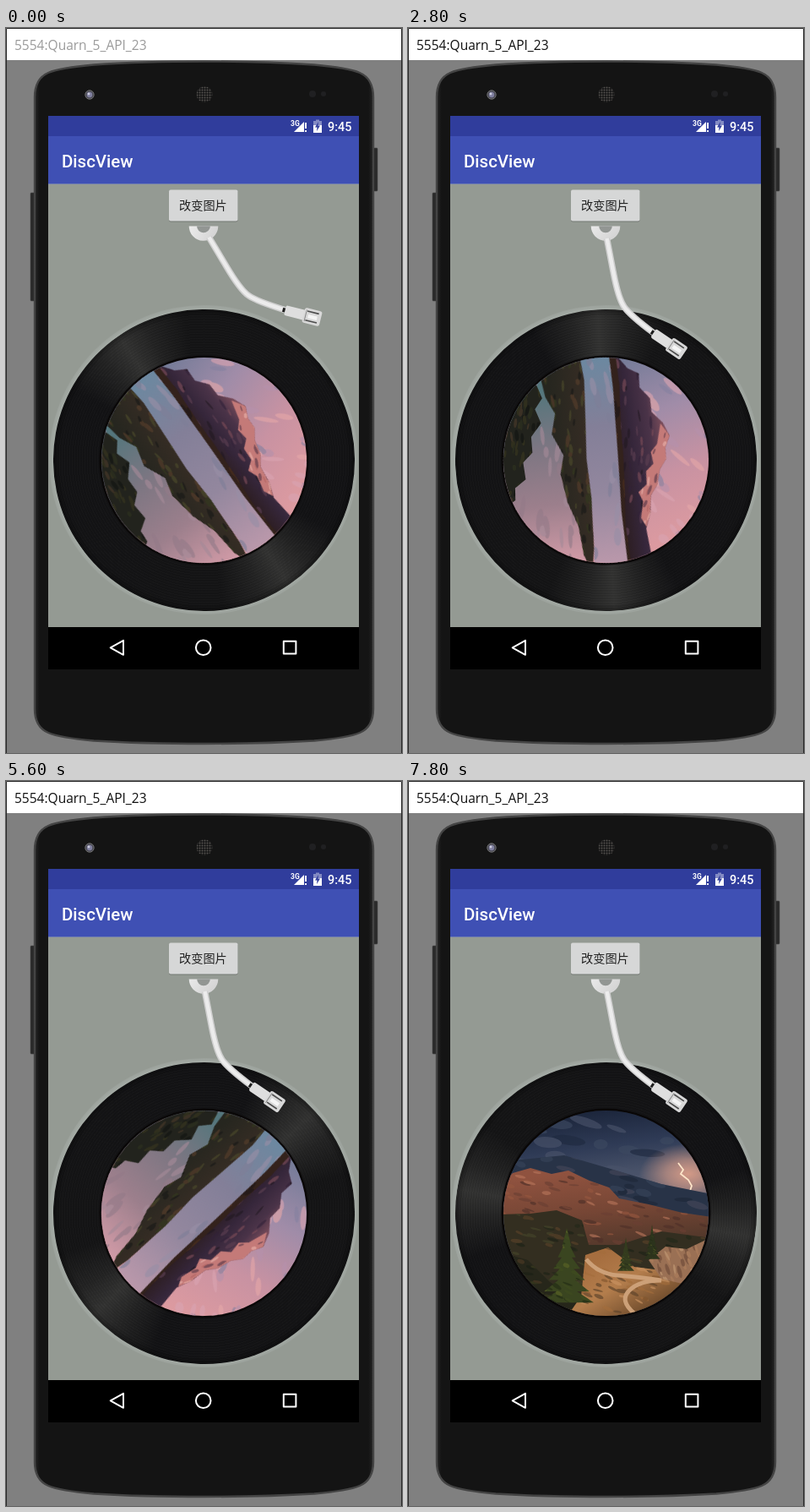
Animation, 469 px wide and 858 px high, one loop 8000 ms. Source, as an HTML page:

```html
<!DOCTYPE html>
<html lang="zh">
<head>
<meta charset="utf-8">
<title>DiscView</title>
<style>
html, body { margin: 0; width: 100%; height: 100%; overflow: hidden; background: #808080; }
#stage { position: relative; width: 469px; height: 858px; overflow: hidden; }
#stage > svg { position: absolute; left: 0; top: 0; }
#view { position: absolute; left: 50px; top: 185px; width: 368px; height: 524px; overflow: hidden; background: #949a93; }
.slot {
  position: absolute; left: 1px; top: 143px; width: 366px; height: 366px; border-radius: 50%;
  background: radial-gradient(closest-side, #a4aba5 97.5%, #9ba19b);
}
.disc {
  position: absolute; left: 4.5px; top: 4.5px; width: 357px; height: 357px; border-radius: 50%;
  background:
    repeating-radial-gradient(circle, rgba(255,255,255,.012) 0 1px, rgba(0,0,0,.06) 1px 3px),
    radial-gradient(circle, transparent 170px, rgba(0,0,0,.3) 178px),
    conic-gradient(from 90deg, #343433, #242424 11deg, #151516 27deg, #131315 153deg, #242424 169deg,
      #343433 180deg, #242424 191deg, #151516 207deg, #131315 333deg, #242424 349deg, #343433);
}
.disc svg { position: absolute; left: 57px; top: 57px; border-radius: 50%; box-shadow: 0 0 0 2.5px #090707; }
.ui { font-family: Roboto, sans-serif; font-weight: 500; fill: #fff; }
.line { fill: none; stroke: #fff; stroke-width: 2; stroke-linejoin: round; }
</style>
</head>
<body>
<div id="stage">
  <svg width="469" height="858">
    <defs>
      <linearGradient id="bezel" x2="1" y2="0">
        <stop offset="0" stop-color="#262626"/><stop offset=".014" stop-color="#141414"/>
        <stop offset=".986" stop-color="#141414"/><stop offset="1" stop-color="#262626"/>
      </linearGradient>
      <pattern id="mesh" width="3" height="3" patternUnits="userSpaceOnUse">
        <rect width="3" height="3" fill="#151515"/><circle cx="1.5" cy="1.5" r="1" fill="#55524f"/>
      </pattern>
    </defs>
    <rect width="469" height="858" fill="#808080"/>
    <rect width="469" height="38" fill="#fff"/>
    <path d="M.5 858V.5H468.5V858" fill="none" stroke="#2b2b2b"/>
    <text id="caption" x="10" y="25.5" font-family="'Open Sans', 'Noto Sans', sans-serif" font-size="15.5">5554:Quarn_5_API_23</text>

    <g fill="#2a2a2a" stroke="#444" stroke-width=".6">
      <rect x="29" y="195" width="6" height="128" rx="1"/>
      <rect x="434" y="142" width="6" height="51" rx="1"/>
    </g>
    <path d="M34 82Q34 60 50 53Q64 47 104 43.5Q160 39.5 234.5 39.5T365 43.5Q405 47 419 53Q435 60 435 82
             V806Q435 827 419 834Q405 840 365 843.5Q309 847 234.5 847T104 843.5Q64 840 50 834Q34 827 34 806Z"
          fill="url(#bezel)" stroke="#444" stroke-width="2.4"/>
    <circle cx="99" cy="79" r="5.2" fill="#4a4a54" stroke="#777" stroke-width=".9"/>
    <circle cx="99" cy="79" r="3.2" fill="#8080a0"/><circle cx="98" cy="78" r="1.4" fill="#ccd"/>
    <circle cx="235" cy="78.5" r="9.5" fill="url(#mesh)"/>
    <g fill="#202022"><circle cx="363" cy="78" r="4"/><circle cx="376" cy="78" r="3"/></g>

    <rect x="50" y="104" width="368" height="655"/>
    <rect x="50" y="104" width="368" height="24" fill="#303d9c"/>
    <rect x="50" y="128" width="368" height="57" fill="#3f50b4"/>
    <rect x="50" y="184" width="368" height="1" fill="#6f7db0"/>
    <g class="ui">
      <text x="337" y="115.5" font-size="8.5" font-weight="700">3G</text>
      <path d="M341 123L353 111V123Z"/>
      <path d="M354 112h2v7h-2zM354 121h2v2h-2z"/>
      <path d="M364 110h3v-1.5h4V110h3v14h-10z" opacity=".4"/>
      <path d="M364 115h10v9h-10z"/>
      <path d="M370 111l-4 6.5h2.5l-.5 4.5 4-6.5h-2.5z" fill="#303d9c"/>
      <text x="381" y="121.5" font-size="14.4">9:45</text>
      <text x="66" y="164.5" font-size="20.45">DiscView</text>
    </g>
    <g class="line">
      <path d="M123.7 733.3L139 724.8V741.8Z"/><circle cx="233.7" cy="733.2" r="8.8"/>
      <rect x="328.8" y="725.8" width="14.6" height="14.6"/>
    </g>
  </svg>

  <div id="view">
    <div class="slot"><div class="disc"><svg width="243" height="243" viewBox="113 389 243 243" id="lake"></svg></div></div>
    <div class="slot"><div class="disc"><svg width="243" height="243" viewBox="113 389 243 243" id="canyon"></svg></div></div>
  </div>

  <svg width="469" height="858">
    <defs>
      <clipPath id="below"><rect x="50" y="234.5" width="368" height="400"/></clipPath>
      <linearGradient id="steel" x2="1" y2="1"><stop offset="0" stop-color="#f2f2f2"/><stop offset="1" stop-color="#cfcfcf"/></linearGradient>
      <path id="arm" d="M235.5 249L243 288Q249 320 256 330Q263 340 291 361" fill="none"/>
    </defs>
    <rect x="193" y="192.5" width="81.5" height="37" rx="2" fill="#000" opacity=".22"/>
    <rect x="193" y="191.5" width="81.5" height="37" rx="2" fill="#d6d7d7"/>
    <text x="205" y="215.3" font-family="'Noto Sans CJK SC', 'Noto Sans CJK', sans-serif" font-size="14.2" fill="#222">改变图片</text>
    <g clip-path="url(#below)">
      <g id="needle">
        <circle cx="234" cy="234.5" r="17.3" fill="url(#steel)"/>
        <circle cx="234" cy="234.5" r="7.8" fill="#929693"/>
        <use href="#arm" stroke="#cfcfcf" stroke-width="7.6"/>
        <use href="#arm" stroke="#ececec" stroke-width="4.5"/>
        <g transform="translate(318 379.5) rotate(34)">
          <rect x="-36" y="-2.5" width="4" height="5" fill="#1c1c1c"/>
          <rect x="-33" y="-6" width="25" height="12" rx="2" fill="#dedede"/>
          <rect x="-10.5" y="-9" width="21" height="18" rx="2.5" fill="#d8d8d8"/>
          <path d="M-7 -5.5H7M-7 5.5H7" stroke="#4c4c4c" stroke-width="1.6"/>
          <path d="M-5 -2H6V2.5H-5Z" fill="#f4f4f4"/>
          <path d="M-8 -7V7" stroke="#888" stroke-width="1"/>
        </g>
      </g>
    </g>
  </svg>
</div>

<script>
const NS = 'http://www.w3.org/2000/svg';
const el = (parent, tag, attrs) => {
  const node = parent.appendChild(document.createElementNS(NS, tag));
  for (const k in attrs) node.setAttribute(k, attrs[k]);
  return node;
};
let seed = 7;
const rnd = () => (seed = seed * 16807 % 2147483647) / 2147483647;
let ids = 0;

function gradient(svg, x1, y1, x2, y2, colors) {
  const id = 'g' + ids++;
  const g = el(svg, 'linearGradient', { id, x1, y1, x2, y2, gradientUnits: 'userSpaceOnUse' });
  colors.forEach((c, i) => el(g, 'stop', { offset: i / (colors.length - 1), 'stop-color': c }));
  return `url(#${id})`;
}

// A filled outline with strokes of texture scattered inside it.
function region(svg, d, fill, colors = [], count = 0, tilt = 0, size = 4) {
  const shape = el(svg, 'path', { d, fill });
  if (!count) return;
  const id = 'c' + ids++, box = shape.getBBox();
  el(el(svg, 'clipPath', { id }), 'path', { d });
  const g = el(svg, 'g', { 'clip-path': `url(#${id})`, opacity: .65 });
  for (let i = 0; i < count; i++) {
    const x = box.x + rnd() * box.width, y = box.y + rnd() * box.height;
    el(g, 'ellipse', {
      cx: x, cy: y, rx: size * (.6 + rnd()), ry: size * (.2 + rnd() * .3),
      fill: colors[i % colors.length], transform: `rotate(${tilt + rnd() * 24 - 12} ${x} ${y})`
    });
  }
}

function drawLake(svg) {
  const paint = (...a) => gradient(svg, ...a);
  // sky
  region(svg, 'M100 380H370V640H100Z', paint(290, 400, 310, 620, ['#747b98', '#a08ca8', '#c892a2', '#dc9aa0']),
    ['#d9a3b0', '#8580a0', '#e3a6a8', '#b590aa'], 110, 62, 11);
  // mountains
  region(svg, 'M272 385L284 398L291 414L302 424L298 440L306 456L303 472L312 488L315 505L306 517L303 530L292 540L284 556L273 566L266 586L256 602L252 640H215Z',
    paint(245, 510, 312, 522, ['#2c1d20', '#35263a', '#4a3348', '#8c5662']),
    ['#33233a', '#5d3f52', '#231a22', '#7c4c58'], 150, 108, 5);
  region(svg, 'M309 488L315 505L306 517L303 530L292 540L284 556L273 566L266 586L257 600L254 588L262 570L260 558L272 552L276 537L287 531L288 517L298 510Z', '#c47a78',
    ['#e8b0a8', '#5a3848', '#b46462'], 60, 125, 4);
  region(svg, 'M270 385L282 396L276 430L263 478L256 510L246 548L234 590L226 640H212Z', '#33221c',
    ['#4d3020', '#1f1819', '#5a3926'], 70, 105, 5);
  // river
  region(svg, 'M240 385H276L268 430L250 508L234 574L222 640H180L192 600L205 545L213 500L227 450L238 410Z',
    paint(256, 392, 208, 625, ['#6c88a0', '#837f98', '#93879e', '#b897aa']), ['#988fa6', '#7f7f98'], 50, 104, 9);
  // wooded bank
  region(svg, 'M188 385H241L238 412L227 452L213 502L205 547L190 606L180 632L176 610L180 575L176 545L178 510L188 490L182 462L193 440L186 418Z',
    paint(190, 430, 230, 440, ['#26261f', '#352c24']),
    ['#4c4a2c', '#1a1a18', '#573e2b', '#34391f'], 140, 104, 5);
  // bay
  region(svg, 'M100 380H190L188 418L193 440L182 462L188 490L178 510L176 545L180 575L176 610L180 645H100Z',
    paint(186, 410, 150, 610, ['#54767c', '#7d7682', '#9c7f8c', '#d09aa6']), ['#a48a98', '#937a88'], 45, 104, 9);
  region(svg, 'M100 380H193L182 400L184 418L172 428L174 446L158 458L154 476L140 484L137 504L122 510L118 524L100 530Z', '#22231d',
    ['#39371f', '#131412', '#4a3a2a', '#2e321f'], 130, 110, 5);
}

function pine(svg, x, top, base, width, color) {
  let d = '';
  for (let i = 0; i < 6; i++) {
    const y = top + (base - top) * i / 6.5, w = width * (i + 1) / 12;
    d += `M${x} ${y - 4}L${x + w} ${y + (base - top) / 5}H${x - w}Z`;
  }
  region(svg, d, color, ['#596326', '#232c15', '#3f4c20'], 45, 25, width / 12);
}

function drawCanyon(svg) {
  const paint = (...a) => gradient(svg, ...a);
  region(svg, 'M100 380H370V640H100Z', paint(235, 390, 245, 470, ['#1d273d', '#2f3b56', '#4d566c']),
    ['#3d4961', '#202a40', '#4a526a'], 80, 8, 13);
  const id = 'glow', g = el(svg, 'radialGradient', { id });
  [['0', 1], ['.45', .65], ['1', 0]].forEach(([offset, a]) =>
    el(g, 'stop', { offset, 'stop-color': '#d39a87', 'stop-opacity': a }));
  el(svg, 'ellipse', { cx: 332, cy: 464, rx: 58, ry: 36, fill: 'url(#glow)' });
  el(svg, 'path', { d: 'M320 451L326 459L323 464L332 471L336 478L333 487', fill: 'none', stroke: '#ffe5c9', 'stroke-width': 1.8 });
  region(svg, 'M105 450L185 442L240 458L300 476L360 488V530H105Z', '#283347', ['#37445a', '#1e2839', '#44485a'], 60, 9, 9);
  region(svg, 'M105 482L124 463L145 457L170 464L190 460L215 472L238 480L250 493L285 500L325 510L360 515V580H105Z',
    paint(220, 460, 230, 555, ['#8f523f', '#764635', '#50372a']),
    ['#b57459', '#4f3029', '#95573f', '#6b4034'], 170, 14, 5);
  region(svg, 'M105 512L145 511L176 507L206 519L214 548L250 548L300 532L360 540V645H105Z', '#332e20',
    ['#22291a', '#45452a', '#594229', '#1d2217'], 140, 15, 5);
  region(svg, 'M210 560L237 551L268 574L300 578L340 556L360 562V645H170L205 610Z',
    paint(230, 560, 270, 630, ['#a66e3f', '#b37d4c', '#75502f']),
    ['#c99361', '#83562f', '#a36d3c', '#5d432a'], 100, 20, 5);
  region(svg, 'M285 566L305 550L330 553L357 540V585L325 594L300 588Z', '#9a7054', ['#c29a75', '#6d4b39', '#ad7e5c'], 50, 70, 5);
  el(svg, 'path', {
    d: 'M211 565Q225 582 248 584T300 590Q274 590 262 602T268 629', fill: 'none', stroke: '#cca078', 'stroke-width': 5
  });
  region(svg, 'M105 555L142 566L168 592L202 613L180 645H105Z', '#26261a', ['#3b3c20', '#4c3924', '#1b2015'], 50, 10, 5);
  pine(svg, 289, 528, 566, 19, '#2c331c');
  pine(svg, 258, 543, 580, 20, '#343b1e');
  pine(svg, 188, 532, 619, 64, '#3a4520');
}

drawLake(document.getElementById('lake'));
drawCanyon(document.getElementById('canyon'));

const LOOP = 8000, WIDTH = 368;
// Moments at which the screen refreshes.
const ticks = [0, 13, 15, 17, 18, 20, 22, 23, 25, 26, 28, 29, 30, 32, 33, 35, 36, 38, 40, 49, 51, 52, 54, 56, 57,
  59, 60, 62, 63, 65, 66, 68, 74, 75, 77, 78].map(n => n * 100);
const spin = [[1600, 55.5], [2000, 67], [3500, 104], [4000, 119.5], [5000, 119.5], [5600, 137.5], [5900, 144]];
const slide = [[5800, 0], [5900, 14], [6000, 42], [6200, 114], [6300, 157], [6500, 285], [6600, 335], [6800, WIDTH]];

function track(keys, t) {
  const i = keys.findIndex(k => k[0] > t);
  if (i === 0) return keys[0][1];
  if (i < 0) return keys[keys.length - 1][1];
  const [a, u] = keys[i - 1], [b, v] = keys[i];
  return u + (v - u) * (t - a) / (b - a);
}

const slots = document.querySelectorAll('.slot'), discs = document.querySelectorAll('.disc');
const needle = document.getElementById('needle'), caption = document.getElementById('caption');
// Each picture is drawn already turned, so undo that inside its disc.
document.getElementById('lake').style.transform = 'rotate(-104deg)';
document.getElementById('canyon').style.transform = 'rotate(-9deg)';

function frame(now) {
  const time = now % LOOP;
  const t = ticks.filter(k => k <= time).pop() || 0;
  const angle = track(spin, t), x = track(slide, t);
  const raised = t < 1500 || (t >= 4000 && t < 4900) || (t >= 5900 && t < 7400);
  slots[0].style.transform = `translateX(${x}px)`;
  slots[1].style.transform = `translateX(${x - WIDTH}px)`;
  discs[0].style.transform = `rotate(${angle}deg)`;
  discs[1].style.transform = `rotate(${t < 7400 ? angle : (t - 7400) * .0225}deg)`;
  needle.setAttribute('transform', `rotate(${raised ? -20 : 0} 234 234.5)`);
  caption.setAttribute('fill', t < 1300 ? '#9b9b9b' : '#111');
  requestAnimationFrame(() => frame(performance.now()));
}
frame(performance.now());
</script>
</body>
</html>
```
